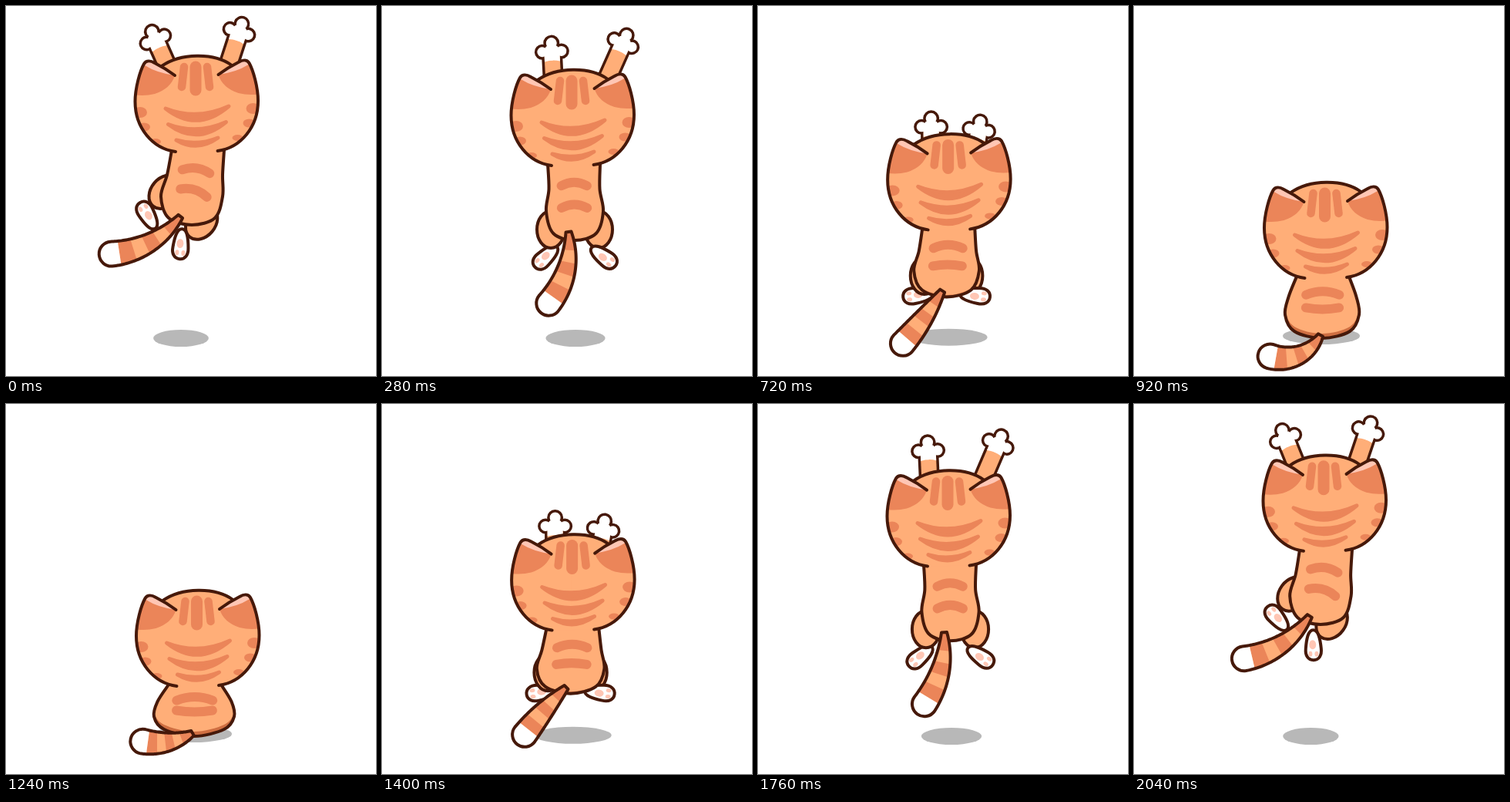
An HTML page with a canvas that plays this animation: 480x480 px, repeating every 2.08 s.

```html
<!DOCTYPE html>
<html lang="en">
<head>
<meta charset="utf-8">
<title>Jumping cat</title>
<style>
html, body { margin: 0; width: 100%; height: 100%; overflow: hidden; background: #fff; }
canvas { display: block; }
</style>
</head>
<body>
<canvas id="stage" width="480" height="480"></canvas>
<script>
const c = document.getElementById('stage').getContext('2d');
const LOOP = 2080, STEP = 40, DEG = Math.PI / 180;
const FUR = '#ffae78', STRIPE = '#eb8559', LINE = '#46190a', PINK = '#ffc6b4',
      SHADE = '#cf6f42', SHADOW = '#b8b8b8';

// Angles in degrees. Arms: angle from upright, reach. Legs and feet: spread, height below the
// bottom of the body. Tail: direction at its root and tip, length.
const apex = {
  drop: -54, ground: 0, swing: 40, hip: 241, bottom: 284, waist: 36, half: 40,
  armL: [-24, 74], armR: [18, 76], leg: [31, -14], foot: [28, 24], toes: [200, 55],
  tail: [128, 176, 105]
};
const air = {
  drop: -36, ground: 0, swing: 0, hip: 250, bottom: 304, waist: 33, half: 37,
  armL: [-3, 70], armR: [24, 83], leg: [31, -14], foot: [37, 21], toes: [137, 37],
  tail: [82, 130, 99]
};
const stretch = {
  drop: 0, ground: 0, swing: 0, hip: 245, bottom: 337, waist: 32, half: 38,
  armL: [0, 90], armR: [15, 75], leg: [37, -24], foot: [52, 10], toes: [168, 12],
  tail: [125, 82, 92]
};
const sit = {
  drop: 110, ground: 1, swing: 0, hip: 244, bottom: 431, waist: 44, half: 48,
  armL: [0, 10], armR: [0, 10], leg: [18, -32], foot: [16, -18], toes: [180, 0],
  tail: [118, 198, 77]
};
const dip = { ...sit, drop: 123, waist: 48, half: 52, tail: [150, 192, 67] };
const wag = { ...dip, tail: [126, 195, 84] };

const keys = [[0, apex], [280, air], [560, stretch], [920, sit], [1100, wag], [1240, dip],
  [1520, stretch], [1800, air], [LOOP, apex]];

const mix = (a, b, k) => Array.isArray(a) ? a.map((v, i) => mix(v, b[i], k)) : a + (b - a) * k;

function poseAt(t) {
  const i = keys.findIndex(k => k[0] > t);
  const [t0, from] = keys[i - 1], [t1, to] = keys[i];
  const u = (t - t0) / (t1 - t0), ease = (u + u * u * (3 - 2 * u)) / 2;
  const p = {};
  for (const name in from) p[name] = mix(from[name], to[name], ease);
  return p;
}

function fill(path, color) { c.fillStyle = color; c.fill(path); }
function stroke(path, color = LINE, width = 4) {
  c.strokeStyle = color;
  c.lineWidth = width;
  c.stroke(path);
}
function oval(x, y, rx, ry, color) {
  const p = new Path2D();
  p.ellipse(x, y, rx, ry, 0, 0, 7);
  fill(p, color);
  return p;
}
function group(draw) { c.save(); draw(); c.restore(); }

// Smooth curve through points.
function curve(pts) {
  const p = new Path2D(), at = i => pts[Math.max(0, Math.min(pts.length - 1, i))];
  p.moveTo(...pts[0]);
  for (let i = 0; i < pts.length - 1; i++) {
    const [a, b, d, e] = [i - 1, i, i + 1, i + 2].map(at);
    p.bezierCurveTo(b[0] + (d[0] - a[0]) / 6, b[1] + (d[1] - a[1]) / 6,
      d[0] - (e[0] - b[0]) / 6, d[1] - (e[1] - b[1]) / 6, ...d);
  }
  return p;
}

const PAW = new Path2D();
for (const [x, y, r] of [[-12.5, 0, 6.5], [0, -11, 7], [12.5, 0, 6.5], [0, 1, 10.5]]) {
  PAW.moveTo(x + r, y);
  PAW.arc(x, y, r, 0, 7);
}

function arm(x, y, [angle, reach]) {
  group(() => {
    c.translate(x, y);
    c.rotate(angle * DEG);
    c.translate(0, -reach);
    const limb = new Path2D();
    limb.rect(-10, 4, 20, reach);
    stroke(limb, LINE, 7);
    stroke(PAW, LINE, 7);
    fill(limb, FUR);
    fill(PAW, '#fff');
    fill(new Path2D('M-10 4H10V13Q0 10 -10 13Z'), '#fff');
  });
}

const SOLE = new Path2D('M-19 0C-19 -7 -6 -9 5 -10C14 -11 20 -7 20 0C20 7 14 11 5 10C-6 9 -19 7 -19 0Z');

function foot(x, y, angle) {
  group(() => {
    c.translate(x, y);
    c.rotate(angle * DEG);
    fill(SOLE, '#fff');
    stroke(SOLE);
    oval(0, 1, 6, 4.5, PINK);
    for (const s of [-1, 1]) oval(12, 4 * s, 3.5, 2.5, PINK);
  });
}

function legs({ hip, bottom, swing, leg, foot: [spread, low], toes }) {
  group(() => {
    c.translate(hip + swing / 3, bottom - 52);
    c.rotate(swing * DEG);
    foot(-spread, 52 + low, toes[0]);
    for (const s of [-1, 1]) stroke(oval(s * leg[0], 52 + leg[1], 18, 24, FUR));
    foot(spread, 52 + low, toes[1]);
  });
}

function body({ drop, ground, swing, hip, bottom, waist, half }) {
  const top = drop + 241, high = bottom - top, neck = 249 - 4 * ground;
  const mid = (neck + hip) / 2;
  const side = s => [
    [neck + s * 34, top],
    [mid + s * waist, top + high * .33],
    [hip + s * half, top + high * .62],
    [hip + s * half * .75, bottom - 9]
  ];
  const shape = curve([...side(-1), [hip, bottom], ...side(1).reverse()]);
  fill(shape, FUR);
  group(() => {
    c.clip(shape);
    fill(shape, SHADE);
    c.translate(0, -6 * ground);
    fill(shape, FUR);
  });
  for (const [at, bend] of [[.24, 9], [.53, 9 - 13 * ground]]) {
    group(() => {
      c.translate(mix(neck, hip, at), top + high * at);
      c.rotate(swing * at * .8 * DEG);
      const w = half * .45, p = new Path2D();
      p.moveTo(-w, bend / 2);
      p.quadraticCurveTo(0, -bend / 2, w, bend / 2);
      stroke(p, STRIPE, 12);
    });
  }
  stroke(shape);
}

const EDGE = 'M220 243C190 239 167.5 212 167.5 178C167.5 160 174 138 179 129C182 124 188 125 193 128';
const SIDE = new Path2D(EDGE + 'Q207 135 219 144');
const CROWN = new Path2D('M202 132C226 115 270 114 293 131');
const EAR = new Path2D('M160 169V120L191 126Q207 135 219 144Q214 161 193 168Q177 172 160 168Z');
const EAR_TIP = new Path2D('M180 131Q186 122 193 128Q207 135 219 144Q196 141 180 131Z');
const MIRROR = new DOMMatrix([-1, 0, 0, 1, 494.5, -1]);
const HALF = new Path2D(EDGE + 'L202 132Q225 118 250 118V243Z');
const HEAD = new Path2D(HALF);
HEAD.addPath(new Path2D('M250 118V243H220Z'));
const RIGHT_HALF = new Path2D();
RIGHT_HALF.addPath(HALF, MIRROR);

function head() {
  const mirror = draw => {
    draw(0);
    group(() => { c.transform(-1, 0, 0, 1, MIRROR.e, MIRROR.f); draw(1); });
  };
  mirror(right => group(() => {
    fill(HALF, FUR);
    c.clip(HALF);
    fill(EAR, STRIPE);
    fill(EAR_TIP, PINK);
    for (let i = 0; i < 3; i++) oval(174 + 5 * i * i, 192 + 19 * i - 4 * right, 9 - i, 7 - 1.5 * i, STRIPE);
  }));
  for (let i = 0; i < 3; i++) {
    const w = 41 - 3.5 * i * i, y = 187 + 20.5 * i, sag = 16 - 2 * i * i;
    const brow = new Path2D(`M${248 - w} ${y}Q248 ${y + sag} ${248 + w} ${y - 3}Q248 ${y + 2 * sag} ${248 - w} ${y}Z`);
    fill(brow, STRIPE);
    stroke(brow, STRIPE, 5);
  }
  for (const i of [-1, 0, 1]) {
    const p = new Path2D(`M${246 + 15 * i} 133L${246 + 18 * i} ${163 - 4 * Math.abs(i)}`);
    stroke(p, STRIPE, 15 - 4.5 * Math.abs(i));
  }
  stroke(CROWN);
  mirror(() => stroke(SIDE));
}

function tail({ hip, bottom, ground, swing, tail: [root, tip, len] }) {
  const N = 50, spots = [];
  let x = hip - 8 + 6 * ground - swing / 6, y = bottom - 11 + 7 * ground;
  for (let i = 0; i <= N; i++) {
    const t = i / N, dir = mix(root, tip, t) * DEG;
    spots.push({ x, y, dir, r: 3.5 + 21 * t - 8.5 * t * t });
    x += Math.cos(dir) * len / N;
    y += Math.sin(dir) * len / N;
  }
  const ribbon = (from, to) => {
    const p = new Path2D(), part = spots.slice(Math.round(from * N), Math.round(to * N) + 1);
    const edge = (q, s) => p.lineTo(q.x - s * q.r * Math.sin(q.dir), q.y + s * q.r * Math.cos(q.dir));
    part.forEach(q => edge(q, 1));
    if (to === 1) {
      const q = spots[N];
      p.arc(q.x, q.y, q.r, q.dir + Math.PI / 2, q.dir - Math.PI / 2, true);
    }
    part.reverse().forEach(q => edge(q, -1));
    p.closePath();
    return p;
  };
  const whole = ribbon(0, 1);
  fill(whole, FUR);
  for (const [a, b] of [[0, .24], [.4, .56], [.72, .9]]) fill(ribbon(a, b), STRIPE);
  fill(ribbon(.9, 1), '#fff');
  stroke(whole);
}

function frame(now) {
  const p = poseAt(Math.floor(now % LOOP / STEP) * STEP);
  const shift = draw => group(() => { c.translate(1.5 * p.ground, p.drop); draw(); });
  c.fillStyle = '#fff';
  c.fillRect(0, 0, 480, 480);
  c.lineCap = c.lineJoin = 'round';
  oval(251 - .6 * p.swing - 8 * p.ground, 431 - 3 * p.ground, Math.min(50, 44 + p.drop * .15), 11, SHADOW);
  shift(() => { arm(224, 165, p.armL); arm(279, 160, p.armR); });
  legs(p);
  body(p);
  shift(head);
  tail(p);
}

const start = performance.now();
function tick() {
  frame(performance.now() - start);
  requestAnimationFrame(tick);
}
tick();
</script>
</body>
</html>
```
